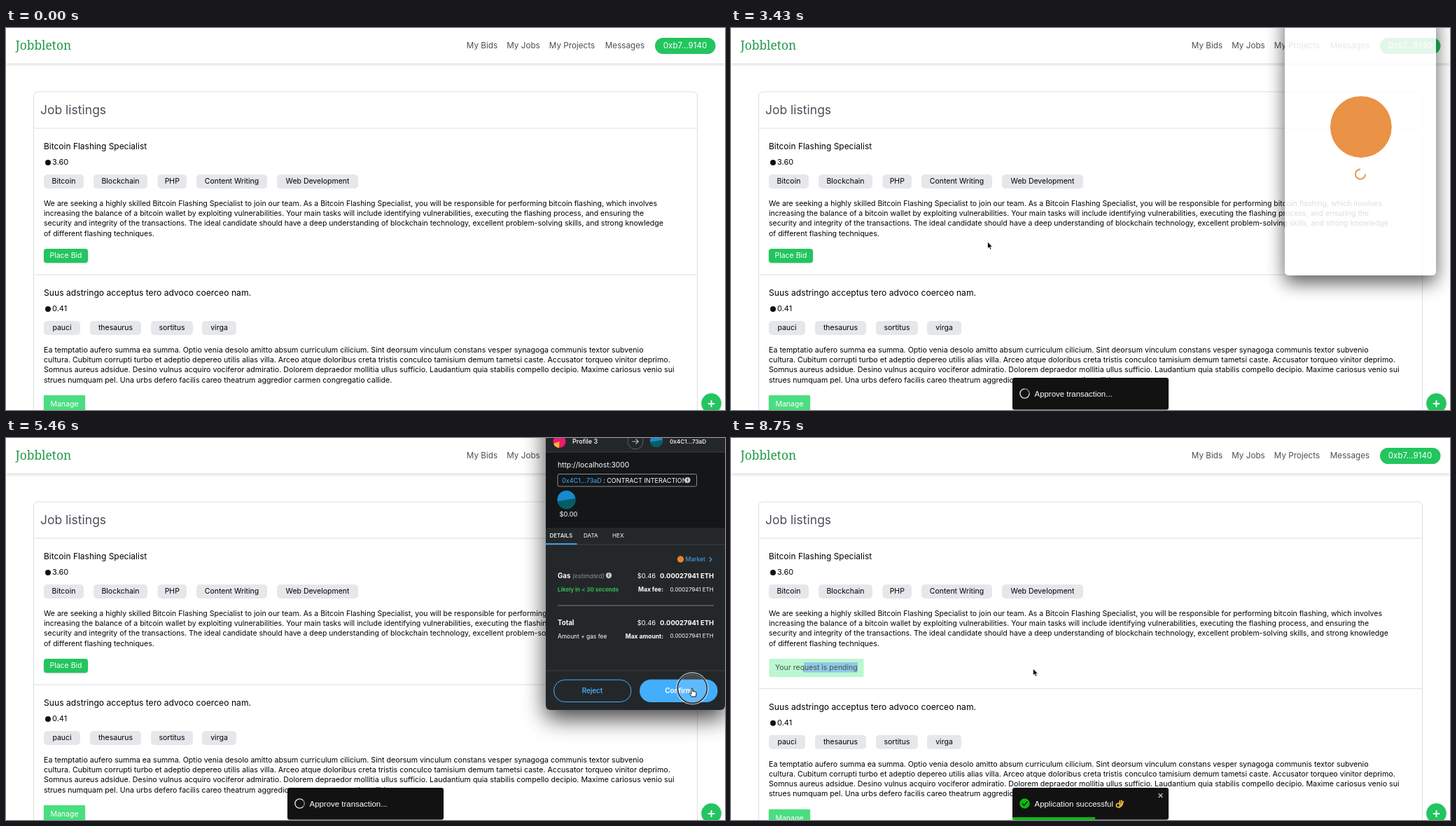
Write an HTML page that moves like this. It is 1027 by 545 pixels and loops after 8.82 s.

```html
<!DOCTYPE html>
<html lang="en">
<head>
<meta charset="utf-8">
<title>Job listings</title>
<style>
  html, body { margin: 0; width: 100%; height: 100%; overflow: hidden; background: #fff; }
  svg { display: block; width: 100%; height: 100%; }
  text { font-family: Inter, "Open Sans", sans-serif; font-optical-sizing: none; white-space: pre; }
  .brand { font-family: "Noto Serif", serif; }
  .toast text { font-family: "Liberation Sans", Arial, sans-serif; }
  .header { filter: drop-shadow(0 1.5px 2px rgba(0,0,0,.2)); }
  .raised { filter: drop-shadow(0 1px 1.5px rgba(0,0,0,.16)); }
  .window { filter: drop-shadow(0 12px 16px rgba(0,0,0,.75)); }
</style>
</head>
<body>
<svg id="stage" viewBox="0 0 1027 545" preserveAspectRatio="none"></svg>
<script>
const LOOP = 8820, STEP = 70;
const GREEN = '#22c55e', BLUE = '#43aefc', LINE = '#dcdee2', BODY = 10.5;

const escapeText = s => s.replace(/&/g, '&amp;').replace(/</g, '&lt;');

// cy is the middle of the capitals
function text(x, cy, s, { size = BODY, fill = '#000', weight = 400, anchor = 'start', extra = '' } = {}) {
  return `<text x="${x}" y="${(cy + size * 0.36).toFixed(2)}" font-size="${size}" fill="${fill}"
    font-weight="${weight}" text-anchor="${anchor}" ${extra}>${escapeText(s)}</text>`;
}
const rect = (x, y, w, h, fill, rx = 0, extra = '') =>
  `<rect x="${x}" y="${y}" width="${w}" height="${h}" fill="${fill}" rx="${rx}" ${extra}/>`;
const circle = (x, y, r, fill, extra = '') => `<circle cx="${x}" cy="${y}" r="${r}" fill="${fill}" ${extra}/>`;
const path = (d, stroke, width = 1, fill = 'none') =>
  `<path d="${d}" stroke="${stroke}" stroke-width="${width}" fill="${fill}"/>`;

function job(y, { size, title, price, tags, lines }) {
  const chips = tags.map(([label, x, w]) =>
    rect(x, y + 66, w, 20, '#e5e7eb', 5) + text(x + w / 2, y + 75.7, label, { anchor: 'middle' })).join('');
  return text(54, y + 26, title, { size: size * 1.14 })
    + circle(60, y + 49, 4, '#111')
    + text(66, y + 48.5, price, { size: 11 })
    + chips
    + lines.map((line, i) => text(54, y + 107 + i * 14.3, line, { size })).join('');
}

const firstJob = {
  size: 10.5, title: 'Bitcoin Flashing Specialist', price: '3.60',
  tags: [['Bitcoin', 54, 57], ['Blockchain', 125, 77], ['PHP', 216.5, 41.5],
    ['Content Writing', 272, 101], ['Web Development', 387, 116]],
  lines: [
    'We are seeking a highly skilled Bitcoin Flashing Specialist to join our team. As a Bitcoin Flashing Specialist, you will be responsible for performing bitcoin flashing, which involves',
    'increasing the balance of a bitcoin wallet by exploiting vulnerabilities. Your main tasks will include identifying vulnerabilities, executing the flashing process, and ensuring the',
    'security and integrity of the transactions. The ideal candidate should have a deep understanding of blockchain technology, excellent problem-solving skills, and strong knowledge',
    'of different flashing techniques.']
};
const secondJob = {
  size: 10.66, title: 'Suus adstringo acceptus tero advoco coerceo nam.', price: '0.41',
  tags: [['pauci', 54, 52], ['thesaurus', 120, 73], ['sortitus', 207, 60], ['virga', 280, 49]],
  lines: [
    'Ea temptatio aufero summa ea summa. Optio venia desolo amitto absum curriculum cilicium. Sint deorsum vinculum constans vesper synagoga communis textor subvenio',
    'cultura. Cubitum corrupti turbo et adeptio depereo utilis alias villa. Arceo atque doloribus creta tristis conculco tamisium demum tametsi caste. Accusator torqueo vinitor deprimo.',
    'Somnus aureus adsidue. Desino vulnus acquiro vociferor admiratio. Dolorem depraedor mollitia ullus sufficio. Laudantium quia stabilis compello decipio. Maxime cariosus venio sui',
    'strues numquam pel. Una urbs defero facilis careo theatrum aggredior carmen congregatio callide.']
};

function page() {
  const nav = [['My Bids', 680], ['My Jobs', 739], ['My Projects', 808.5], ['Messages', 884]]
    .map(([label, x]) => text(x, 25, label, { size: 11.7, fill: '#4b4f58', anchor: 'middle' })).join('');
  const white = { fill: '#fff', anchor: 'middle' };
  return `
    ${rect(0, 0, 1027, 545, '#fff')}
    ${rect(39.5, 91, 948, 500, '#fff', 6, `stroke="${LINE}"`)}
    ${text(49, 117, 'Job listings', { size: 17.5, fill: '#4b4f58' })}
    ${path('M40 143H987', LINE)}
    ${job(143, firstJob)}
    <g id="bid">
      ${rect(54, 315, 63, 20, GREEN, 4, 'class="raised"')}${text(85.5, 324.7, 'Place Bid', white)}
    </g>
    <g id="pending">
      ${rect(54.5, 315, 135, 26, '#bbf7d0')}
      ${rect(104, 320, 77, 14.5, '#91c8e6', 0, 'id="selection"')}
      ${text(63, 327.5, 'Your request is pending', { fill: '#44554e' })}
    </g>
    <g id="lower">
      ${path('M40 352H987', LINE)}
      ${job(352, secondJob)}
      ${rect(54, 524, 59, 26, '#4ade80', 1, 'class="raised"')}${text(83.5, 536.5, 'Manage', white)}
    </g>
    <g class="header">${rect(0, 0, 1027, 50.5, '#fff')}</g>
    ${text(13.5, 24.5, 'Jobbleton', { size: 17.4, fill: '#22994a', weight: 500, extra: 'class="brand"' })}
    ${nav}
    ${rect(927, 14, 86.5, 23, GREEN, 11.5)}
    ${text(970, 25, '0xb7...9140', { ...white, size: 11.6 })}
    <g class="raised">${circle(1007.5, 535.5, 14.2, GREEN)}</g>
    ${path('M1002.8 536H1012.2M1007.5 531.3V540.7', '#fff', 2)}`;
}

function toast() {
  const label = { size: 11.45, fill: '#fff' };
  return `
    <g class="raised">${rect(402, 499, 223, 45.5, '#121212', 3)}</g>
    <g id="waiting">
      ${circle(419.5, 521.5, 6.6, 'none', 'stroke="#e0e0e0" stroke-width="1.4"')}
      <path id="toastSpin" d="M424.2 516.8A6.6 6.6 0 0 1 424.2 526.2" fill="none" stroke="#616161" stroke-width="1.6"/>
      ${text(433.5, 521.5, 'Approve transaction...', label)}
    </g>
    <g id="success">
      ${circle(419.5, 521.5, 7.2, '#07bc0c')}
      ${path('M416 521.6L418.6 524.3L423.2 518.8', '#121212', 1.5)}
      ${text(433.5, 521.5, 'Application successful', label)}
      ${circle(553, 524, 2.7, 'none', 'stroke="#f5b83d" stroke-width="1.6"')}
      ${path('M555 523L555.5 517M557 524L558.2 516.5M558 525L560.6 518M554 527.5L558 524.5', '#f5b83d', 1.7)}
      ${path('M610.7 507.2L616.5 513M616.5 507.2L610.7 513', '#c4c4c4', 1.3)}
      ${rect(402, 541, 223, 3.5, '#07bc0c', 0, 'id="progress"')}
    </g>`;
}

const info = (x, y) => circle(x, y, 4.2, '#c3c8cd') + text(x, y, 'i', { size: 6.5, weight: 700, fill: '#141618', anchor: 'middle' });
const avatar = (x, y, r) => circle(x, y, r, '#168bd2')
  + `<path d="M${x - r} ${y + r * .2}L${x + r * .98} ${y - r * .15}A${r} ${r} 0 0 1 ${x - r} ${y + r * .2}" fill="#075d63"/>`;

function feeRow(y, name, note, noteStyle, maxLabel) {
  const end = { fill: '#fff', anchor: 'end' };
  return text(788, y, name, { size: 9.7, weight: 700, fill: '#fff' })
    + text(928, y, '$0.46', { ...end, size: 9.4 })
    + text(1011, y, '0.00027941 ETH', { ...end, size: 9.45, weight: 700 })
    + text(788, y + 19.3, note, noteStyle)
    + text(939, y + 19.3, maxLabel, { ...end, size: 8.5, weight: 700 })
    + text(1010.5, y + 19.3, '0.00027941 ETH', { ...end, size: 7.9 });
}

function confirmation() {
  const white = { fill: '#fff', size: 9.1 };
  return `
    ${rect(771, -60, 256, 448, '#24272a', 6)}
    ${rect(771, 20, 256, 108, '#141618')}
    ${path('M771 20H1027M771 152H1027M771 332H1027', '#3b4046')}
    ${circle(790.5, 5, 9, '#e91e70')}
    ${path('M790.5 5L782 8A9 9 0 0 0 790 14Z', 'none', 0, '#f5b82e')}
    ${text(809, 5, 'Profile 3', { ...white, weight: 500 })}
    ${circle(899, 5, 11, '#24272a', 'stroke="#596068"')}
    ${path('M894.5 5H903M899.5 1.3L903.2 5L899.5 8.7', '#b5bbc1', 1.2)}
    ${avatar(929, 4, 9)}
    ${text(948, 5, '0x4C1...73aD', { ...white, size: 8.2, weight: 500 })}
    ${text(788, 38.5, 'http://localhost:3000', { ...white, size: 10.3 })}
    ${rect(788, 51.5, 198.5, 17.5, 'none', 2, 'stroke="#858b92"')}
    ${text(794, 60.3, '0x4C1...73aD', { size: 9.1, fill: BLUE })}
    ${text(853, 60.3, ': CONTRACT INTERACTION', white)}
    ${info(973.5, 60)}
    ${avatar(800.5, 88, 13)}
    ${text(790.5, 109, '$0.00', { ...white, size: 9.4 })}
    ${text(776.5, 139.5, 'DETAILS', { ...white, size: 8, weight: 500 })}
    ${text(825, 139.5, 'DATA', { ...white, size: 8.1 })}
    ${text(866, 139.5, 'HEX', { ...white, size: 8.1 })}
    ${rect(771, 150.3, 44.5, 1.8, BLUE)}
    ${circle(963.5, 173, 4.7, '#e8832a')}
    ${text(970.5, 173.3, 'Market', { size: 8.6, fill: BLUE })}
    ${path('M1004.8 170L1007.8 173.2L1004.8 176.4', BLUE, 1.1)}
    ${feeRow(196.5, 'Gas', 'Likely in < 30 seconds', { size: 8, weight: 700, fill: '#34b84f' }, 'Max fee:')}
    ${text(809, 196.5, '(estimated)', { size: 8.5, fill: '#8d949b', extra: 'font-style="italic"' })}
    ${info(861, 196)}
    ${path('M788 239H1011', '#7a8087')}
    ${feeRow(263.3, 'Total', 'Amount + gas fee', { size: 8.4, fill: '#fff' }, 'Max amount:')}
    ${rect(782.5, 345, 110.5, 31.5, 'none', 15.75, `stroke="${BLUE}"`)}
    ${text(837.5, 360.5, 'Reject', { size: 9.8, weight: 600, fill: BLUE, anchor: 'middle' })}
    ${rect(905, 344.5, 111.5, 32.5, BLUE, 16.25)}
    ${text(960.5, 360.5, 'Confirm', { size: 9.8, weight: 600, fill: '#fff', anchor: 'middle' })}`;
}

function wallet() {
  return `
    ${rect(771, -60, 256, 448, '#fff', 6)}
    <g id="loading">
      ${circle(900, 137, 52, '#e8832a')}
      <path id="walletSpin" d="M899 208.6A8.4 8.4 0 1 0 907.4 217" fill="none" stroke="#e38a35" stroke-width="2.4"/>
      <g id="status">
        ${rect(771, 373, 84.5, 15, '#0d1016', 2)}
        ${text(774, 380.7, 'Waiting for sentr...', { size: 8.4, weight: 600, fill: '#fff' })}
      </g>
    </g>
    <g id="confirmation">${confirmation()}</g>`;
}

const pointers = `
  <g id="ring">
    ${circle(0, 0, 21.5, 'rgba(255,255,255,.15)', 'stroke="rgba(255,255,255,.6)" stroke-width="3.4"')}
    ${circle(0, 0, 21, 'none', 'stroke="#27323b" stroke-width="1.7"')}
  </g>
  <g id="pointer">
    <g id="arrow">${path('M0 0V9.8L2.2 7.8L3.8 11.3L5.5 10.5L4 7.2H7Z', '#fff', .8, '#000')}</g>
    <g id="hand">${path('M-1 1C-1 -.3 1 -.3 1 1V5L1.4 4.3C2.4 3.9 3 4.3 3.1 5C4 4.5 4.6 5 4.7 5.7C5.6 5.3 6.2 5.9 6.1 6.8L5.4 12H-.6L-3.6 8.2C-4 7.2-3 6.5-2.2 7.2L-1 8.3Z', '#000', .9, '#fff')}</g>
    <g id="beam">${path('M-2.5 0C-1 0 0 .5 0 1.5C0 .5 1 0 2.5 0M0 1V10M-2.5 11C-1 11 0 10.5 0 9.5C0 10.5 1 11 2.5 11', '#222', 1)}</g>
  </g>`;

const stage = document.getElementById('stage');
stage.innerHTML = `
  ${page()}
  <g id="toast" class="toast">${toast()}</g>
  <g id="wallet" class="window">${wallet()}</g>
  ${pointers}`;

const parts = {};
stage.querySelectorAll('[id]').forEach(el => { parts[el.id] = el; });
const show = (id, on) => parts[id].setAttribute('display', on ? 'inline' : 'none');
const set = (id, name, value) => parts[id].setAttribute(name, value);

const linear = p => p;
const smooth = p => p * p * (3 - 2 * p);

// Interpolates points of the form [time, ...values]
function track(points, t, ease = linear) {
  if (t <= points[0][0]) return points[0].slice(1);
  const next = points.findIndex(p => p[0] > t);
  if (next < 0) return points[points.length - 1].slice(1);
  const a = points[next - 1], b = points[next];
  const p = ease((t - a[0]) / (b[0] - a[0]));
  return a.slice(1).map((v, i) => v + (b[i + 1] - v) * p);
}

const pointerPath = [
  [70, 330, 540], [560, 88, 378], [700, 88, 378], [1050, 78, 335], [1190, 78, 335], [1260, 80, 333],
  [1330, 80, 333], [1680, 76, 323.5], [2520, 76, 323.5], [3360, 366.5, 305], [3430, 366.5, 305],
  [4200, 982, 347], [5040, 982, 347], [5250, 980, 357], [6160, 980, 357], [7000, 588, 340],
  [7630, 100, 324], [7980, 104, 322], [8400, 190, 326], [8750, 431.5, 329]
];
const toastPath = [[2520, 300], [2940, -14], [3045, 7], [3150, -3.6], [3220, 0]];
const walletPath = [
  [3430, .844, .87], [3500, .94, .96], [3570, .985, 1], [3640, 1, 1],
  [5810, 1, 1], [5880, .97, .5], [5950, .95, 0]
];
const SUCCESS = 6400, DIALOG = 4760, SELECT = 7980;

function render(t) {
  const done = t >= SUCCESS;
  const [x, y] = track(pointerPath, t, smooth);

  show('bid', !done);
  show('pending', done);
  set('lower', 'transform', `translate(0 ${done ? 5.7 : 0})`);
  set('selection', 'width', t < SELECT ? 0 : Math.max(0, Math.min(77, x - 104)));

  show('toast', t >= 2520);
  set('toast', 'transform', `translate(0 ${track(toastPath, t)[0]})`);
  show('waiting', !done);
  show('success', done);
  set('toastSpin', 'transform', `rotate(${(t - 3430) / 650 * 360 - 45} 419.5 521.5)`);
  set('progress', 'width', 223 * Math.min(1, 1 - (t - SUCCESS) / 5000));

  const [scale, opacity] = track(walletPath, t);
  show('wallet', t >= 3430 && opacity > 0);
  set('wallet', 'opacity', opacity);
  set('wallet', 'transform', `translate(899 163) scale(${scale}) translate(-899 -163)`);
  show('loading', t < DIALOG);
  show('status', t >= 3990);
  show('confirmation', t >= DIALOG);
  set('walletSpin', 'transform', `rotate(${(t - 4340) / 910 * 360} 899 217)`);

  const overBid = t >= 1050 && t < 3430 && x < 117 && y > 314 && y < 336;
  const hand = overBid || (t >= DIALOG + STEP && t < 5880);
  const beam = done && x < 185;
  show('pointer', t >= 70);
  set('pointer', 'transform', `translate(${x} ${y})`);
  show('hand', hand);
  show('beam', beam);
  show('arrow', !hand && !beam);
  show('ring', (t >= 2030 && t < 2100) || (t >= 5390 && t < 5600));
  set('ring', 'transform', `translate(${x + .3} ${y + .3})`);
}

const start = performance.now();
function tick() {
  const elapsed = (performance.now() - start) % LOOP;
  render(Math.floor(elapsed / STEP) * STEP);
  requestAnimationFrame(tick);
}
tick();
</script>
</body>
</html>
```
